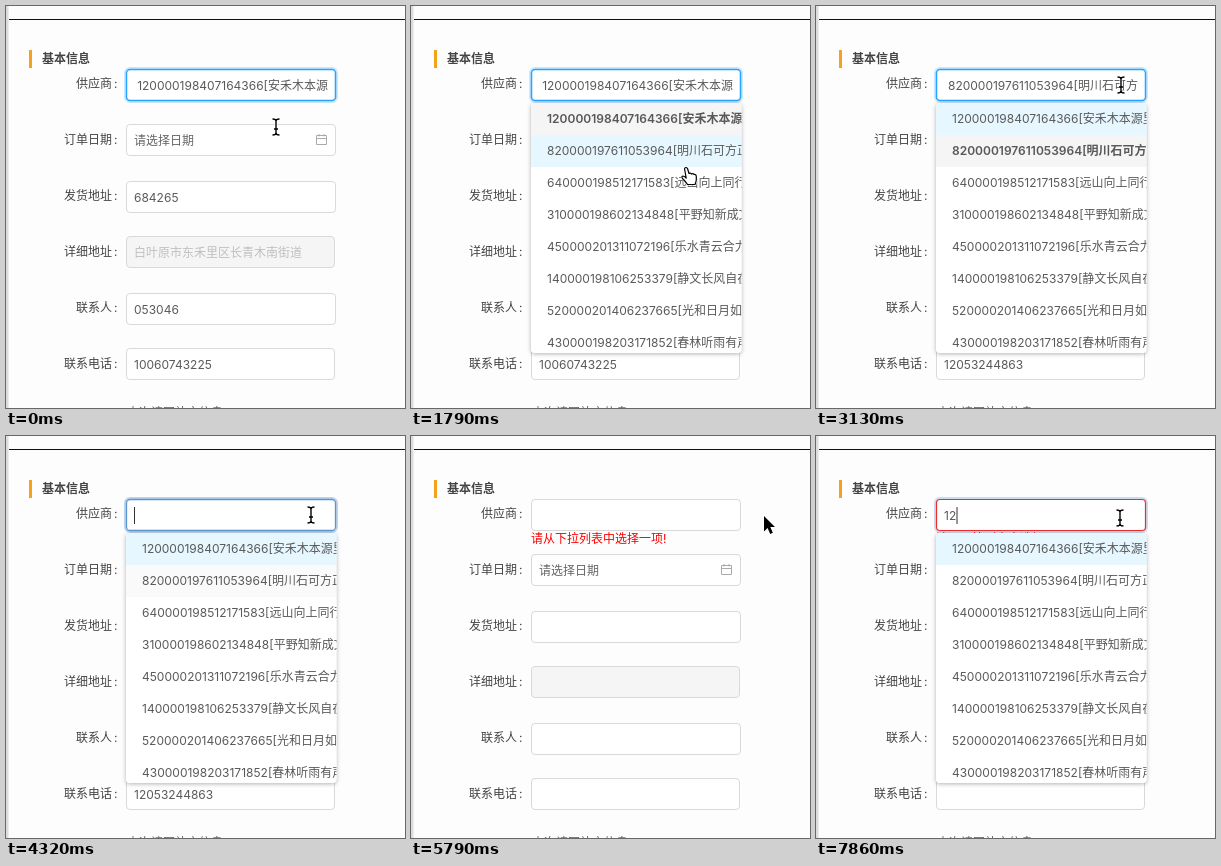
Write an HTML page that moves like this. It is 399 px wide and 402 px high and loops after 8000 ms.

```html
<!DOCTYPE html>
<html lang="zh">
<head>
<meta charset="utf-8">
<style>
html, body { margin: 0; width: 100%; height: 100%; overflow: hidden; background: #fdfdfd; }
svg { display: block; width: 399px; height: 402px; }
text { font: 12px Inter, "Noto Sans CJK SC", "Noto Sans CJK", sans-serif; fill: #595959; white-space: pre; }
.label { fill: #444; }
.title { font-weight: 600; fill: #444; }
.end { text-anchor: end; }
.box { fill: #fff; stroke: #d9d9d9; }
.hint { fill: #666; }
.off { fill: #bfbfbf; }
.error { fill: #f00; }
.icon { fill: none; stroke: #aaa; }
.panel { fill: #fff; filter: drop-shadow(0 1px 2px rgba(0,0,0,.3)); }
</style>
</head>
<body>
<svg id="stage" viewBox="0 0 399 402"></svg>
<script>
const LOOP = 8000;
const options = [
  "120000198407164366[安禾木本源里", "820000197611053964[明川石可方正",
  "640000198512171583[远山向上同行", "310000198602134848[平野知新成文",
  "450000201311072196[乐水青云合力", "140000198106253379[静文长风自在",
  "520000201406237665[光和日月如常", "430000198203171852[春林听雨有声"
];
const records = [
  ["684265", "白叶原市东禾里区长青木南街道", "053046", "10060743225"],
  ["867539", "绿砂原市北木区风来亭街道", "699171", "12053244863"],
  ["", "", "", ""]
];
const labels = ["供应商", "订单日期", "发货地址", "详细地址", "联系人", "联系电话"];
const tops = [63, 118, 175, 230, 287, 342];
const widths = [210, 210, 210, 209, 210, 209];
const shown = options.map(o => o.slice(0, -1));

// Border colour, glow colour and border width of the supplier field.
const tones = {
  idle: ["#d9d9d9", "none", 1],
  hover: ["#40a9ff", "none", 1],
  focus: ["#26a5ff", "rgba(24,144,255,.22)", 1.5],
  shift: ["#5a97cf", "rgba(80,130,200,.35)", 1.3],
  bad: ["#ee2c2c", "rgba(90,140,200,.3)", 1.2],
  fade: ["#e0a8a8", "rgba(90,140,200,.1)", 1]
};

// Each step: time, pointer kind, x, y, changed state.
const steps = [
  [0, "beam", 270, 121, { text: shown[0], tone: "focus", record: 0, sel: 0, active: 0, open: 0,
    date: "#d9d9d9", caret: 0, marked: 0, error: 0, rest: 0 }],
  [140, "beam", 277, 109, { date: "#9fcdf2" }],
  [290, "beam", 285, 97, { date: "#c9d6e0" }],
  [440, "beam", 290, 89, { date: "#d9d9d9" }],
  [590, "beam", 292, 87, {}],
  [1040, "beam", 294, 82, {}],
  [1340, "beam", 294, 82, { open: .45 }],
  [1490, "beam", 293, 86, { open: 1 }],
  [1640, "hand", 285, 126, {}],
  [1790, "hand", 275, 161, { active: 1 }],
  [2090, "hand", 276, 157, { text: shown[1], record: 1, sel: 1, open: .5 }],
  [2240, "beam", 283, 138, { open: 0 }],
  [2390, "beam", 297, 101, { date: "#c0d6e8" }],
  [2540, "beam", 304, 80, { date: "#d9d9d9", active: 0 }],
  [2840, "beam", 304, 81, { open: .45 }],
  [2990, "beam", 304, 80, { open: 1 }],
  [3130, "beam", 305, 79, {}],
  [3580, "beam", 305, 79, { marked: 1 }],
  [4320, "beam", 305, 79, { marked: 0, text: "", caret: 1, sel: -1, tone: "shift", rest: 1 }],
  [4470, "beam", 305, 79, { tone: "bad", rest: 0 }],
  [4910, "beam", 313, 79, {}],
  [5060, "arrow", 336, 79, {}],
  [5210, "arrow", 350, 80, {}],
  [5350, "arrow", 353, 80, { caret: 0, tone: "fade", open: .5, record: 2, error: 1 }],
  [5500, "arrow", 353, 80, { tone: "idle", open: 0 }],
  [6080, "arrow", 343, 80, {}],
  [6220, "beam", 316, 80, { tone: "hover" }],
  [6370, "beam", 304, 78, {}],
  [7120, "beam", 304, 78, { tone: "shift", caret: 1, open: .45 }],
  [7270, "beam", 304, 78, { tone: "bad", open: 1 }],
  [7560, "beam", 304, 78, { text: "1" }],
  [7860, "beam", 304, 82, { text: "12" }]
];

const beam = "M-3.5-8Q0-8 0-6Q0-8 3.5-8M0-6V6M-3.5 8Q0 8 0 6Q0 8 3.5 8M-2 2H2";
const hand = "M-1.5 1.5Q0-.5 1.5 1.5L3 6.5Q4.5 5.5 5.5 7Q7 6 8 7.5Q10 7 10.3 9.5V13" +
  "Q10 15 9 17.5H1.5Q0 15-3.5 11.5Q-5 9.5-3 9Q-1.8 9 .2 11Z";
const arrow = "M0 0V15.5L3.6 12L6.2 18L8.8 16.8L6.3 11H11Z";

const text = (x, y, value, attrs = "") => `<text x="${x}" y="${y}" ${attrs}>${value}</text>`;
const rect = (x, y, w, h, attrs = "") =>
  `<rect x="${x}" y="${y}" width="${w}" height="${h}" ${attrs}/>`;
const field = i => rect(120.5, tops[i] + .5, widths[i] - 1, 31,
  `rx="3.5" class="box" id="box${i}"` + (i === 3 ? ' style="fill:#f5f5f5"' : ""));

const stage = document.getElementById("stage");
stage.innerHTML = `
  <defs>
    <clipPath id="inner">${rect(128, 64, 194, 30)}</clipPath>
    <clipPath id="list">${rect(120, 97, 210.5, 250, 'rx="4"')}</clipPath>
  </defs>
  ${rect(0, 0, 399, 402, 'fill="#fdfdfd"')}
  ${rect(0, 0, 2.5, 402, 'fill="#dcdcdc"')}
  ${rect(3, 13, 396, 1, 'fill="#111"')}
  ${rect(23, 44, 3, 18, 'fill="#f5a11a"')}
  ${text(36, 57.3, "基本信息", 'class="title"')}
  ${labels.map((s, i) => text(106, 82.3 + 56 * i, s, 'class="label end"') +
    text(108, 82.3 + 56 * i, ":", 'class="label"')).join("")}
  ${rect(119, 62, 212, 34, 'rx="5" fill="none" stroke-width="2" id="glow"')}
  ${tops.map((_, i) => field(i)).join("")}
  ${rect(128, 73, 194, 15, 'fill="#b4d5fe" id="mark"')}
  <g clip-path="url(#inner)">${text(128, 84, "", 'id="supplier"')}</g>
  ${rect(128, 71, 1, 17, 'fill="#333" id="caret"')}
  ${text(128, 138.8, "请选择日期", 'class="hint"')}
  <path class="icon" d="M310.5 129.5H320.5V138.5H310.5ZM310.5 132.5H320.5M313 128V130.5M318 128V130.5"/>
  ${[2, 3, 4, 5].map(i => text(128, tops[i] + 20.5, "",
    `id="value${i}"` + (i === 3 ? ' class="off"' : ""))).join("")}
  ${text(120, 107.3, "请从下拉列表中选择一项!", 'class="error" id="error"')}
  ${text(121, 411, "本次请写补充信息", 'class="hint"')}
  <g id="menu">
    ${rect(120, 97, 210.5, 250, 'rx="4" class="panel"')}
    <g clip-path="url(#list)">
      ${options.map((s, i) => rect(120, 97 + 32 * i, 211, 32, `id="row${i}"`) +
        text(136, 117.3 + 32 * i, s, `id="option${i}"`)).join("")}
    </g>
  </g>
  <g id="pointer" stroke-linejoin="round">
    <path id="rim" stroke="#fff"/><path id="shape"/>
  </g>`;

const el = {};
stage.querySelectorAll("[id]").forEach(n => el[n.id] = n);
const set = (node, attrs) => {
  for (const k in attrs) node.setAttribute(k, attrs[k]);
};
const show = (node, on) => node.style.display = on ? "" : "none";

function drawPointer(kind, x, y) {
  const d = { beam, hand, arrow }[kind];
  const line = kind === "beam";
  set(el.pointer, { transform: `translate(${x} ${y})` });
  set(el.rim, { d, fill: "none", "stroke-width": line ? 3 : 2.2 });
  set(el.shape, {
    d,
    fill: line ? "none" : kind === "hand" ? "#fff" : "#000",
    stroke: kind === "arrow" ? "none" : "#000",
    "stroke-width": line ? 1.4 : 1.2
  });
}

function drawMenu(s) {
  show(el.menu, s.open > 0);
  const k = .8 + .2 * s.open;
  set(el.menu, { opacity: s.open, transform: `translate(0 ${97 * (1 - k)}) scale(1 ${k})` });
  options.forEach((_, i) => {
    const fill = i === s.active ? "#e6f7ff" : i === s.sel ? "#f5f5f5"
      : i === 1 && s.rest ? "#fafafa" : "#fff";
    set(el["row" + i], { fill });
    el["option" + i].style.fontWeight = i === s.sel ? 600 : 400;
  });
}

function drawFields(s) {
  const [border, glow, width] = tones[s.tone];
  el.box0.style.stroke = border;
  el.box0.style.strokeWidth = width;
  el.box1.style.stroke = s.date;
  set(el.glow, { stroke: glow });
  const long = s.text.length > 9;
  el.supplier.textContent = s.text;
  set(el.supplier, { x: long ? 322 : 128, class: long ? "end" : "" });
  show(el.caret, s.caret);
  if (s.caret) set(el.caret, { x: 128 + (s.text ? el.supplier.getComputedTextLength() + .3 : 0) });
  show(el.mark, s.marked);
  show(el.error, s.error);
  records[s.record].forEach((v, i) => el["value" + (i + 2)].textContent = v);
}

let last = -1;
function render(t) {
  let n = steps.length - 1;
  while (steps[n][0] > t) n--;
  if (n === last) return;
  last = n;
  const state = Object.assign({}, ...steps.slice(0, n + 1).map(s => s[4]));
  const [, kind, x, y] = steps[n];
  drawFields(state);
  drawMenu(state);
  drawPointer(kind, x, y);
}

const start = performance.now();
function tick() {
  render((performance.now() - start) % LOOP);
  requestAnimationFrame(tick);
}
tick();
</script>
</body>
</html>
```
